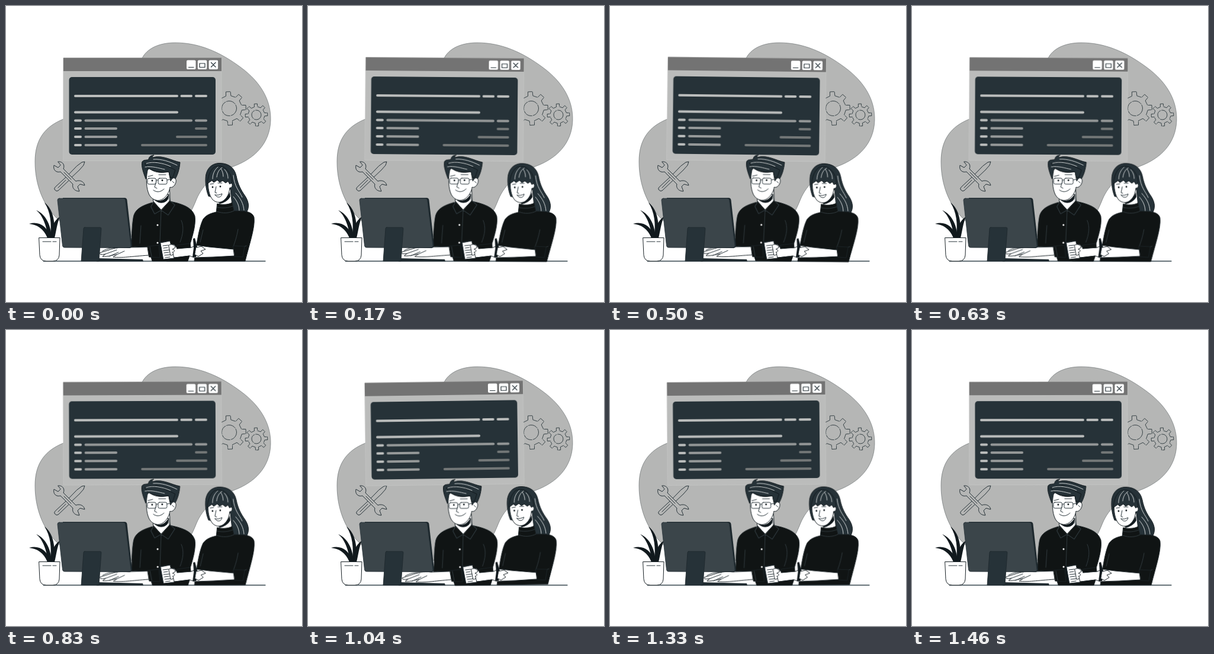
Write an HTML page that moves like this. It is 500 px wide and 500 px high and loops after 1500 ms.

```html
<!DOCTYPE html>
<html lang="en">
<head>
<meta charset="utf-8">
<title>Two colleagues at a desk</title>
<style>
  html, body { margin: 0; width: 100%; height: 100%; overflow: hidden; background: #fff; }
  svg { display: block; width: 100vw; height: 100vh; }
  .sway { animation: sway 1.5s linear infinite; }
  #window { transform-origin: 230.5px 174.5px; }
  #people { transform-origin: 288px 341px; }
  @keyframes sway {
    0%, 100% { transform: rotate(0deg); }
    25% { transform: rotate(1deg); }
    75% { transform: rotate(-1deg); }
  }
  path, line, circle, rect { stroke-linecap: round; stroke-linejoin: round; }
  .ink { fill: none; stroke: #263238; stroke-width: 1; }
  .thin { fill: none; stroke: #2c383d; stroke-width: .9; }
  .skin { fill: #fff; stroke: #182125; stroke-width: 1; }
  .hair { fill: #263238; stroke: #11191d; stroke-width: 1; }
  .cloth { fill: #101414; stroke: #1b2326; stroke-width: 1; }
  .seam { fill: none; stroke: #39454a; stroke-width: .8; }
  .shine { fill: none; stroke: #e3e6e6; stroke-width: .9; }
  .dark { fill: #11191d; }
</style>
</head>
<body>
<svg viewBox="0 0 500 500">
  <!-- backdrop -->
  <path fill="#b5b6b5" stroke="#5d6365" stroke-width=".6" d="M230 88C238 72 258 62 286 62C325 62 361 77 397 104C431 129 448 160 447 193C446 232 420 258 384 271C352 284 333 301 322 326C314 346 305 365 285 376C245 392 150 400 92 364C66 343 49 306 49 263C49 224 67 203 97 191C140 170 208 140 230 88Z"/>
  <g id="gears" class="thin"></g>
  <g class="ink">
    <path d="M120 270L128 264L133 263L131 269L124 277L107 293L103 288ZM103 288L108 293L88 312Q85 314 82 310Q81 308 83 306ZM101 294L88 307"/>
    <path fill="#b5b6b5" d="M88 263C95 262 100 268 97 275L118 296C125 293 132 297 133 303L125 301L121 305L124 313C116 313 111 307 113 301L92 280C85 282 79 277 81 269L88 273L92 269Z"/>
    <path d="M98 281L110 293"/>
  </g>

  <!-- browser window -->
  <g id="window" class="sway">
    <rect x="97" y="88" width="267" height="173.500" fill="#bbbcbb" stroke="#c6c7c6" stroke-width=".7"/>
    <path fill="#737373" d="M97 87.500H364V110H97Z"/>
    <g fill="#fff">
      <rect x="305" y="91.500" width="15.500" height="15.500" rx="2"/>
      <rect x="323.800" y="91.500" width="15.500" height="15.500" rx="2"/>
      <rect x="342.600" y="91.500" width="15.500" height="15.500" rx="2"/>
    </g>
    <path fill="none" stroke="#263238" stroke-width="1.200" d="M308.500 103.500H317M327 97H336V103.500H327ZM346.500 95.500L354 103M354 95.500L346.500 103"/>
    <rect x="106.500" y="120" width="247.500" height="131" rx="5" fill="#263238"/>
    <g id="code" stroke-width="4"></g>
  </g>

  <path stroke="#37474f" stroke-width="1.400" d="M63 431H438"/>

  <!-- plant -->
  <g class="dark">
    <path d="M71 392C69 371 61 352 51 345C64 350 76 366 77 392Z"/>
    <path d="M74 392C78 369 75 347 65 332C79 342 85 366 80 392Z"/>
    <path d="M70 392C64 376 52 369 39 368C54 363 70 371 76 392Z"/>
    <path d="M76 392C76 374 81 362 91 356C86 368 85 380 82 392Z"/>
  </g>
  <path class="skin" d="M56 391.500H91L90 421Q89 431 79 431H68Q58 431 57 421Z"/>
  <path class="ink" d="M62 398H76M79 398H85"/>

  <g id="people" class="sway">
    <!-- woman -->
    <path class="hair" d="M342 321C337 309 336 292 338 284C341 271 351 265 362 265.500C376 266 386 273 389 287C392 302 397 311 404 321C411 332 411 341 406 349L376 347L360 325Z"/>
    <path class="shine" d="M384 286C386 306 394 312 399 323M388 316C397 326 401 334 402 345M384 322C391 330 394 338 394 346"/>
    <path class="skin" d="M361 326L379 309L382 337L360 338Z"/>
    <path class="dark" d="M360 330C369 328 376 320 378 314L379 322C375 329 368 333 361 334Z"/>
    <path class="skin" d="M342 291C340 306 343 320 349 327C354 332 361 333 367 329C374 324 377 316 378 307C382 308 384 301 380 299L377 290Z"/>
    <path class="hair" d="M340 300C341 290 343 279 352 272C365 266 380 276 382 298L378 301L375 296L371 299L366 295L361 298L357 294L351 298L348 295Z"/>
    <path class="shine" d="M349 292C349 283 353 276 358 272M356 289C357 281 360 276 365 273M367 288C367 282 365 278 363 275M375 291C375 284 372 279 369 276"/>
    <path class="ink" d="M345 301L351 300M358 299L365 299M355 305L353 315L356 316M353 319C358 320 361 319 365 317C364 324 357 325 353 319"/>
    <g class="dark"><circle cx="349" cy="306" r="1.400"/><circle cx="362" cy="305" r="1.400"/></g>
    <path class="cloth" d="M357 334C365 336 375 336 382 332L385 346C400 346 416 346 419 357C421 374 412 399 404 431H318C322 401 326 374 333 360C339 352 347 350 355 348Z"/>
    <path class="seam" d="M356 347C366 351 377 350 385 346M357 340C366 342 375 341 383 338M333 378L328 399M392 377C390 389 387 398 384 406M389 407C394 409 399 408 406 405"/>

    <!-- man -->
    <path class="skin" d="M249 319L276 305L278 336L250 337Z"/>
    <path class="cloth" d="M247 332C230 337 217 343 215 358C212 377 213 393 211 407L240 407L247 431H307L311 402C316 386 321 368 319 355C315 342 302 335 277 330L263 347Z"/>
    <path class="skin" d="M249 330L263 346L276 330L275 318L249 322Z"/>
    <path class="dark" d="M246 321C253 332 267 332 275 317L274 326C268 336 253 335 246 321Z"/>
    <path class="cloth" d="M249 331L244 339L251 352L262 345ZM277 329L286 336L274 354L262 345Z"/>
    <path class="seam" d="M249 332L245 339L251 351L262 345L274 353L285 336L278 330M262 347L260 398M228 371L226 401M296 362C301 373 299 386 294 399M217 407L240 408"/>
    <g fill="#fff"><circle cx="256" cy="370" r="1.500"/><circle cx="256" cy="400" r="1.500"/></g>
    <path class="hair" d="M236 292C232 281 228 271 230 263C233 259 238 261 241 259C241 255 245 252 250 252C247 253 247 255 248 256C264 251 279 261 294 264C293 276 290 285 286 292L280 302L277 286L247 277Z"/>
    <path class="skin" d="M239 278C236 292 237 309 242 319C247 328 257 331 265 326C272 321 276 313 277 306C284 309 291 294 285 291C281 289 279 295 278 296L275 280C261 283 249 281 242 274Z"/>
    <path class="hair" d="M240 274C250 280 264 281 275 280L277 290L282 289L286 277L255 262L235 266Z"/>
    <path class="shine" d="M237 266C249 262 264 265 278 271M249 259C263 258 277 263 289 269M235 272C247 270 258 274 268 276"/>
    <g class="ink">
      <path d="M240 288L248 286M258 285L270 285M254 296L251 306L255 308M249 311C255 316 262 314 267 309M281 296L284 299"/>
      <rect x="239" y="291" width="14.500" height="10" rx="2.500"/>
      <rect x="257" y="291" width="15" height="10" rx="2.500"/>
      <path d="M253.500 294L257 294M272 294L280 292"/>
    </g>
    <g class="dark"><circle cx="247" cy="295" r="1.400"/><circle cx="264" cy="294.500" r="1.400"/></g>

    <!-- arms and notebook -->
    <path class="skin" d="M240 407L207 408C194 406 183 409 174 412L158 417C157 420 163 420 168 419L163 423C173 424 181 420 187 420L181 424C195 426 211 423 241 421Z"/>
    <path class="ink" d="M163 414C172 409 180 408 188 409M168 419L187 412M187 420L200 414M174 423L190 416"/>
    <path class="cloth" d="M239 406L258 404L260 425L242 424Z"/>
    <path class="seam" d="M243 407L246 423"/>
    <path class="skin" d="M276 402L284 403L289 409L313 408L321 404L343 407L385 411L387 422L350 424L318 425L310 422L286 425L275 425Z"/>
    <path class="cloth" d="M289 404L311 401L312 408L289 410ZM285 425L310 422L307 431H272ZM384 405L403 406L400 424L386 423Z"/>
    <path class="dark" d="M258 400L261 398L267 427L263 426Z"/>
    <path class="skin" d="M261 400L277 397L284 426L266 428Z"/>
    <path class="ink" stroke-width="1.800" stroke-dasharray="1.500 1.800" d="M261 399L277 396.500"/>
    <path class="ink" d="M265 405L274 404M266 409L273 408M266 413L277 412M267 417L275 416M268 421L279 420M269 425L277 424"/>
    <path class="skin" d="M275 404C280 401 285 404 286 408L281 411C286 411 285 416 281 416C284 418 282 422 278 421Z"/>
    <path class="dark" d="M316 393L319 392L323 407L321 424L315 424L317 409Z"/>
    <path class="skin" d="M321 408L330 406L337 411L329 414L333 418L325 423L319 420Z"/>
  </g>

  <!-- computer -->
  <path fill="#202b30" d="M154 426L231 428L232 431.500H153Z"/>
  <path fill="#1c272c" d="M96 324H200Q204 324 204.500 328L213 404Q213 408 209 409L98 408Z"/>
  <path fill="#3b454a" stroke="#263238" stroke-width=".8" d="M90 325H198Q201 325 201.500 328L211 405Q211 408 208 408H99Q96 408 95.500 405L87 328Q87 325 90 325Z"/>
  <path fill="#263238" stroke="#1d282d" stroke-width=".8" d="M133 374H159Q161 374 161 376L157 431H127L131 376Q131 374 133 374Z"/>
</svg>
<script>
  const NS = "http://www.w3.org/2000/svg";
  const add = (id, tag, attrs) => {
    const el = document.createElementNS(NS, tag);
    for (const key in attrs) el.setAttribute(key, attrs[key]);
    document.getElementById(id).append(el);
  };

  function gear(cx, cy, inner, body, tip, teeth) {
    const step = 2 * Math.PI / teeth;
    const point = (r, a) => (cx + r * Math.sin(a)).toFixed(1) + " " + (cy - r * Math.cos(a)).toFixed(1);
    const pts = [];
    for (let i = 0; i < teeth; i++) {
      const a = i * step - 0.06;
      pts.push(point(body, a - step * .25), point(tip, a - step * .17),
               point(tip, a + step * .17), point(body, a + step * .25));
    }
    add("gears", "path", { d: `M${pts.join("L")}Z`, "stroke-dasharray": "14 1.5" });
    add("gears", "circle", { cx, cy, r: inner, "stroke-dasharray": "16 2" });
  }
  gear(377, 173, 12.5, 21.5, 28.5, 8);
  gear(423, 184, 8, 14, 19, 8);

  const [light, mid, dim] = ["#bcbebd", "#969999", "#737777"];
  const rule = (y, x1, x2, stroke) => add("code", "line", { x1, x2, y1: y, y2: y, stroke });
  rule(152, 117, 289, light);
  rule(152, 296.5, 313, light);
  rule(152, 321, 338, light);
  rule(179.5, 117, 289, light);
  [193.5, 207, 221, 235].forEach((y, i) => {
    rule(y, 117, 126, light);
    rule(y, 134.5, i ? 186 : 313, mid);
    rule(y, [321, 321, 289, 230][i], 338, i ? dim : mid);
  });
</script>
</body>
</html>
```
